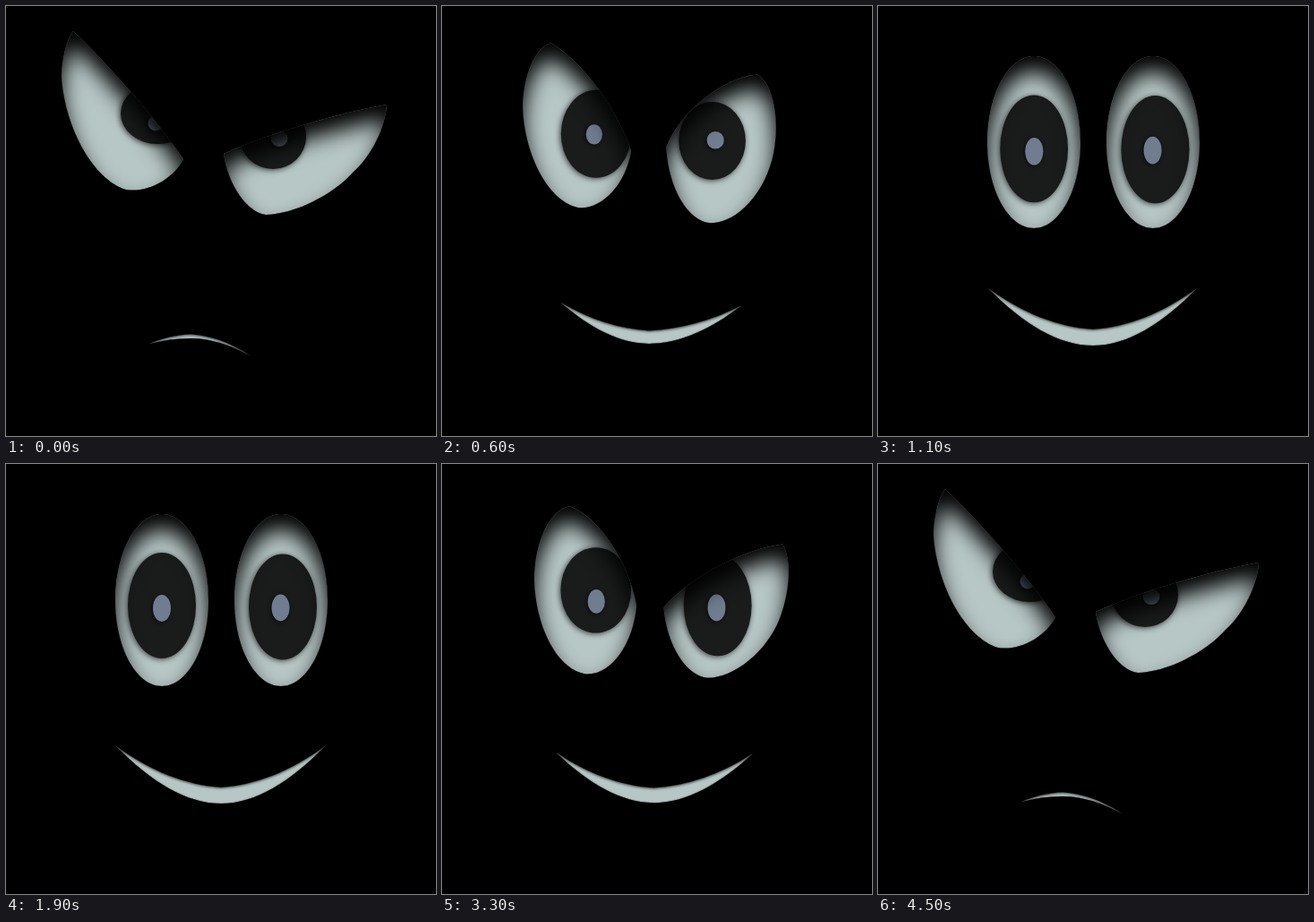
An HTML page with a canvas that plays this animation: 480x480 px, repeating every 5000 ms.

```html
<!DOCTYPE html>
<html lang="en">
<head>
<meta charset="utf-8">
<title>Mood</title>
<style>
  html, body { margin: 0; width: 100%; height: 100%; overflow: hidden; background: #000; }
  canvas { display: block; width: 100vmin; height: 100vmin; }
</style>
</head>
<body>
<canvas id="stage" width="480" height="480"></canvas>
<script>
const ctx = document.getElementById('stage').getContext('2d');
const LOOP = 5000, STEP = 100;
const PALE = '#b7c7c6', DARK = '#1a1c1c', GLINT = '#707c90';
const ROUND = 0.5523;       // handle length that turns a corner into a quarter ellipse
const GLINT_DELAY = 60;

// An angry eye is a ring of eight points: extremes alternating with the corners they round.
// Ovals are [cx, cy, rx, ry]; timings are [start, duration].
const EYES = [
  {
    angry: [[75, 28], [145, 93], [198, 171], [177, 212], [134, 205], [70, 186], [62, 80], [62, 44]],
    happy: ring(174, 152, 52, 96),
    lid: { open: [317, 590], close: [3135, 440] },
    pupil: [[169, 120, 41, 34], [174, 158, 38, 59]],
    glint: [[167, 131, 8.5, 8.5], [174, 161, 10, 15]],
    look: { open: 370, close: 3118 }
  },
  {
    angry: [[425, 110], [423, 155], [388, 185], [347, 232], [290, 233], [252, 228], [243, 165], [326, 127]],
    happy: ring(307, 152, 52, 96),
    lid: { open: [310, 500], close: [3010, 500] },
    pupil: [[298, 146, 37, 36], [309, 159.5, 38, 59]],
    glint: [[305, 148, 9.5, 9], [306.5, 160.5, 10, 15]],
    look: { open: 455, close: 3225 }
  }
];

// Corners of the mouth, then the middles of its lower and upper edges.
const MOUTH = {
  frown: [[160, 377], [272, 390], [206, 371], [206, 366.5]],
  smile: [[123, 315], [356, 315], [240, 379], [240, 361]],
  timing: { open: [217, 575], close: [3182, 575] }
};

function ring(cx, cy, rx, ry) {
  return Array.from({ length: 8 }, (_, i) => {
    const a = i * Math.PI / 4;
    return [cx + rx * Math.sign(Math.round(Math.sin(a) * 9)),
            cy - ry * Math.sign(Math.round(Math.cos(a) * 9))];
  });
}

const lerp = (a, b, p) => a + (b - a) * p;
const mix = (a, b, p) => a.map((v, i) => lerp(v, b[i], p));
const mixPoints = (a, b, p) => a.map((v, i) => mix(v, b[i], p));

function smooth(t, [start, duration]) {
  const u = Math.min(1, Math.max(0, (t - start) / duration));
  return u * u * (3 - 2 * u);
}

function spring(t, start) {
  const s = (t - start) / 1000, decay = 5, freq = 5.2;
  if (s <= 0) return 0;
  return 1 - Math.exp(-decay * s) * (Math.cos(freq * s) + decay / freq * Math.sin(freq * s));
}

const there = (ease, t, { open, close }) => ease(t, open) - ease(t, close);

function eyeOutline(points) {
  const path = new Path2D();
  path.moveTo(...points[0]);
  for (let i = 0; i < 8; i += 2) {
    const from = points[i], corner = points[i + 1], to = points[(i + 2) % 8];
    path.bezierCurveTo(...mix(from, corner, ROUND), ...mix(to, corner, ROUND), ...to);
  }
  return path;
}

function mouthOutline([left, right, lower, upper]) {
  const path = new Path2D();
  // Handles leave each corner steeply and flatten out towards the middle.
  const near = (corner, mid) => [lerp(corner[0], mid[0], 1 / 3), lerp(corner[1], mid[1], 0.62)];
  const far = (corner, mid, flat) => [lerp(corner[0], mid[0], 2 / 3), lerp(corner[1], mid[1], flat)];
  const edge = (from, mid, to, flat) => {
    path.bezierCurveTo(...near(from, mid), ...far(from, mid, flat), ...mid);
    path.bezierCurveTo(...far(to, mid, flat), ...near(to, mid), ...to);
  };
  path.moveTo(...left);
  edge(left, lower, right, 1);
  edge(right, upper, left, 0.94);
  return path;
}

function shadow(alpha, blur, dx, dy) {
  ctx.shadowColor = `rgba(0,0,0,${alpha})`;
  ctx.shadowBlur = blur;
  ctx.shadowOffsetX = dx;
  ctx.shadowOffsetY = dy;
}

function oval([cx, cy, rx, ry], color) {
  ctx.fillStyle = color;
  ctx.beginPath();
  ctx.ellipse(cx, cy, rx, ry, 0, 0, Math.PI * 2);
  ctx.fill();
}

// Fills a shape, draws its content inside, then shades it from its own edge.
function shaded(path, blur, drop, alpha, content) {
  ctx.save();
  ctx.clip(path);
  ctx.fillStyle = PALE;
  ctx.fillRect(0, 0, 480, 480);
  if (content) content();
  const outside = new Path2D();
  outside.rect(-100, -100, 680, 680);
  outside.addPath(path);
  shadow(alpha, blur, 0, drop);
  ctx.fillStyle = '#000';
  ctx.fill(outside, 'evenodd');
  ctx.restore();
}

function drawEye(eye, t) {
  const path = eyeOutline(mixPoints(eye.angry, eye.happy, there(smooth, t, eye.lid)));
  shaded(path, 24, 17, 1, () => {
    ctx.save();
    shadow(0.7, 6, -1, 1);
    oval(mix(...eye.pupil, there(spring, t, eye.look)), DARK);
    shadow(0.7, 4, -1, 1);
    oval(mix(...eye.glint, there(spring, t - GLINT_DELAY, eye.look)), GLINT);
    ctx.restore();
  });
}

function draw(t) {
  ctx.fillStyle = '#000';
  ctx.fillRect(0, 0, 480, 480);
  EYES.forEach(eye => drawEye(eye, t));
  const smile = there(smooth, t, MOUTH.timing);
  shaded(mouthOutline(mixPoints(MOUTH.frown, MOUTH.smile, smile)), 3, 1, 0.7);
}

const begin = performance.now();
function tick() {
  const t = (performance.now() - begin) % LOOP;
  draw(Math.floor(t / STEP) * STEP);
  requestAnimationFrame(tick);
}
tick();
</script>
</body>
</html>
```
